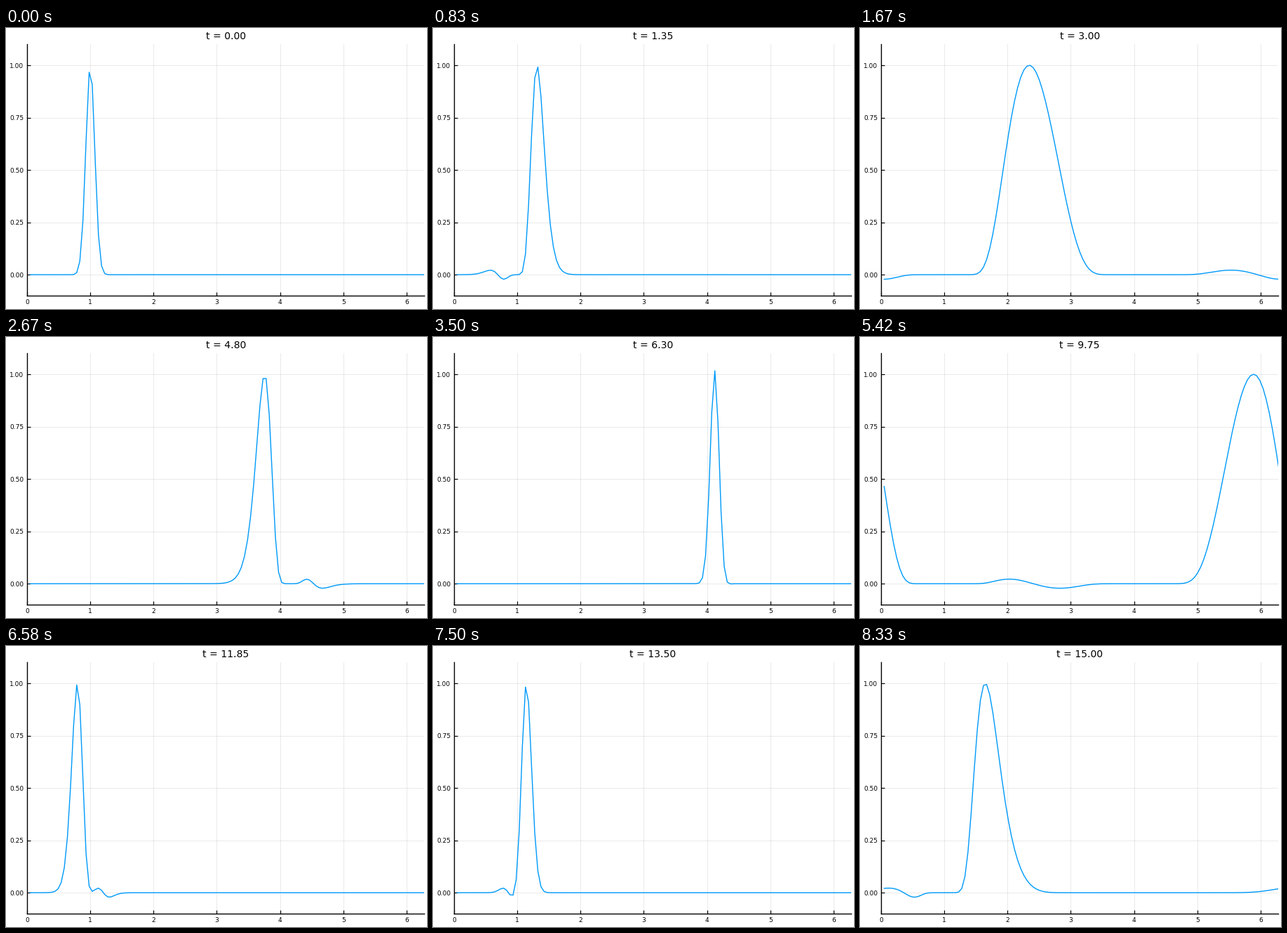
A matplotlib script for the animation above (8.41 s loop, 600x400 px).

```python
import numpy as np
import matplotlib.pyplot as plt
from matplotlib.animation import FuncAnimation

W, H, DPI = 600, 400, 100
PX = 72 / DPI                      # points per pixel
LEFT, RIGHT, TOP, BOTTOM = 30, 596.4, 23.4, 381
FRAMES, LOOP_MS = 101, 8410
N, T_STEP = 128, 0.15


def solve():
    """Leapfrog in time, Fourier in space, for u_t + c(x) u_x = 0."""
    h = 2 * np.pi / N
    x = h * np.arange(1, N + 1)
    substeps = round(T_STEP / (h / 4))
    dt = T_STEP / substeps
    c = 0.2 + np.sin(x - 1) ** 2
    ik = 1j * np.fft.fftfreq(N, 1 / N)
    ik[N // 2] = 0

    v = np.exp(-100 * (x - 1) ** 2)
    old = np.exp(-100 * (x - 0.2 * dt - 1) ** 2)
    waves = [v]
    for _ in range(FRAMES - 1):
        for _ in range(substeps):
            slope = np.fft.ifft(ik * np.fft.fft(v)).real
            old, v = v, old - 2 * dt * c * slope
        waves.append(v)
    return x, waves


x, waves = solve()

plt.rcParams["font.family"] = "DejaVu Sans"
fig = plt.figure(figsize=(W / DPI, H / DPI), dpi=DPI, facecolor="white")
ax = fig.add_axes([LEFT / W, 1 - BOTTOM / H,
                   (RIGHT - LEFT) / W, (BOTTOM - TOP) / H])
ax.set_xlim(0, 2 * np.pi)
ax.set_ylim(-0.1, 1.1)
ax.set_xticks(range(7))
ax.set_yticks(np.arange(5) / 4, [f"{y / 4:.2f}" for y in range(5)])
ax.set_axisbelow(True)
ax.grid(color="black", alpha=0.1, linewidth=0.8 * PX)
ax.tick_params(direction="in", length=5 * PX, width=1.2 * PX, pad=5 * PX,
               labelsize=9 * PX)
for side in ("top", "right"):
    ax.spines[side].set_visible(False)
for side in ("left", "bottom"):
    ax.spines[side].set_linewidth(1.4 * PX)

line, = ax.plot(x, waves[0], color="#009AFA", linewidth=1.4 * PX)
title = fig.text((LEFT + RIGHT) / 2 / W, 1 - 15.5 / H, "", fontsize=14 * PX,
                 ha="center", va="baseline")


def update(i):
    line.set_ydata(waves[i])
    title.set_text(f"t = {i * T_STEP:.2f}")
    return line, title


anim = FuncAnimation(fig, update, frames=FRAMES, interval=LOOP_MS / FRAMES,
                     repeat=True, repeat_delay=0)
plt.show()
```
